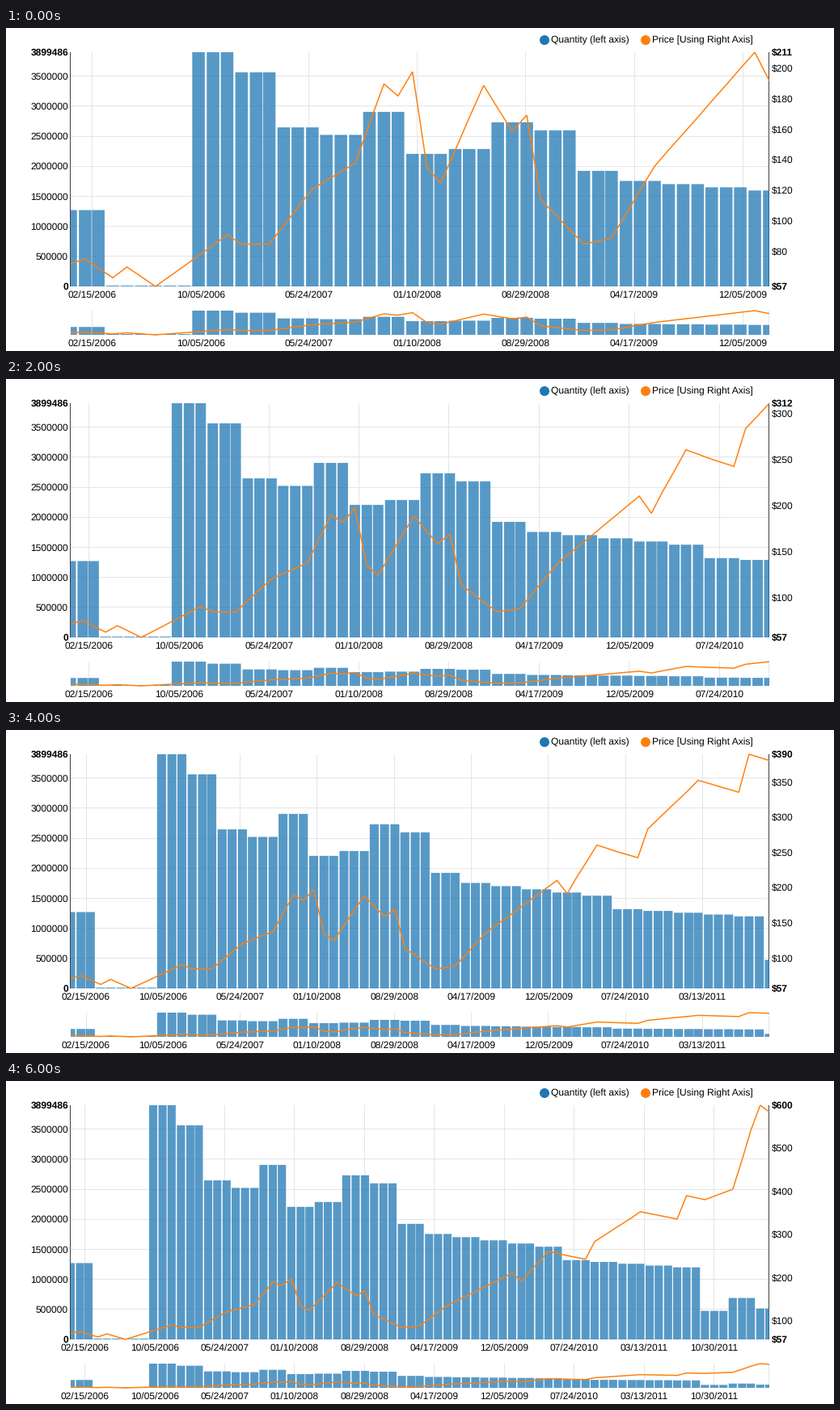
Recreate the animation shown at these times as a matplotlib script. Size 1024x400 px, loop 7000 ms.

```python
import numpy as np
import matplotlib.pyplot as plt
from matplotlib.animation import FuncAnimation
from matplotlib.patches import Circle, Rectangle

WIDTH, HEIGHT, DPI = 1024, 400, 100
PT = 72 / DPI                      # points per pixel
LEFT, RIGHT = 80, 944
MAIN = (30, 320)                   # top and bottom of each panel
FOCUS = (350, 380)
BLUE, ORANGE, GRID, AXIS = "#1f77b4", "#ff7f0e", "#e5e5e5", "#404040"

# Turning points, joined by straight runs
PRICE_TURNS = {0: 72, 1: 75.5, 3: 63, 4: 70, 6: 57.3, 11: 91, 12: 85, 14: 85,
               17: 121, 20: 138, 22: 190, 23: 182, 24: 198, 25: 135, 26: 125,
               29: 189, 31: 159, 32: 169.5, 33: 114, 36: 85, 38: 89, 41: 136,
               48: 210.7, 49: 192, 52: 261, 54: 251.5, 56: 243, 57: 284,
               62: 353, 66: 336, 67: 390, 69: 381, 72: 405, 74: 542,
               75: 599.6, 76: 584}
# Thousands sold, by quarter
QUANTITY_TURNS = {0: 1271, 1: 0, 2: 0, 3: 3899.486, 4: 3565, 5: 2648, 6: 2523,
                  7: 2906, 8: 2207, 9: 2288, 10: 2733, 11: 2599, 12: 1924,
                  13: 1756, 17: 1544, 18: 1320, 22: 1200, 23: 475, 24: 690,
                  25: 515}


def follow(turns, at):
    return np.interp(at, list(turns), list(turns.values()))


STEP_MONTHS = np.arange(77)
PRICE = follow(PRICE_TURNS, STEP_MONTHS)
QUANTITY = 1000 * follow(QUANTITY_TURNS, STEP_MONTHS // 3)

# Month ends in seconds, starting with December 2005
NEXT_MONTH = np.datetime64("2006-01") + STEP_MONTHS
TIMES = NEXT_MONTH.astype("datetime64[s]").astype(float) - 19 * 3600
DATE_STEP = 2e7

plt.rcParams["font.family"] = "Liberation Sans"
plt.rcParams["text.hinting"] = "none"
fig = plt.figure(figsize=(WIDTH / DPI, HEIGHT / DPI), dpi=DPI, facecolor="white")
ax = fig.add_axes([0, 0, 1, 1])


def crisp(v):
    """Centre of the pixel a one-pixel line falls on."""
    return np.ceil(v) - 0.5


def scale(value, domain, pixels):
    low, high = domain
    return pixels[0] + (value - low) / (high - low) * (pixels[1] - pixels[0])


def label(x, baseline, text, ha="left", bold=False):
    ax.text(x, baseline, text, ha=ha, va="baseline", fontsize=12 * PT,
            color="black", weight="bold" if bold else "normal", zorder=5)


def rule(xs, ys, color=GRID, z=1):
    ax.plot(xs, ys, color=color, lw=PT, zorder=z, solid_capstyle="butt", snap=False)


def date_text(seconds):
    day = np.datetime64(int(seconds) + 7200, "s").astype("datetime64[D]")
    year, month, dom = str(day).split("-")
    return f"{month}/{dom}/{year}"


def nice_step(span, count=8):
    """Round tick step of 1, 2 or 5 times a power of ten."""
    step = 10.0 ** np.floor(np.log10(span / count))
    error = count / span * step
    for limit, factor in ((0.15, 10), (0.35, 5), (0.75, 2)):
        if error <= limit:
            return step * factor
    return step


def draw_panel(panel, count):
    top, bottom = panel
    times, prices = TIMES[:count], PRICE[:count]
    span = times[0], times[-1]

    def to_x(t):
        return scale(t, span, (LEFT, RIGHT))

    first = np.ceil(span[0] / DATE_STEP) * DATE_STEP
    for tick in np.arange(first, span[1], DATE_STEP):
        x = to_x(tick)
        rule([crisp(x)] * 2, [top, bottom])
        label(x, bottom + 14, date_text(tick), "center")
    rule([crisp(RIGHT)] * 2, [top, bottom])

    clip = Rectangle((LEFT, top), RIGHT - LEFT, bottom - top, transform=ax.transData)
    slot = (RIGHT - LEFT) / count
    heights = np.maximum(QUANTITY[:count] / QUANTITY.max() * (bottom - top), 1)
    for x, height in zip(to_x(times), heights):
        bar = Rectangle((x - 0.45 * slot, bottom - height), 0.9 * slot, height,
                        fc=BLUE, alpha=0.75, lw=0, zorder=3, snap=False)
        ax.add_patch(bar)
        bar.set_clip_path(clip)

    y = scale(prices, (prices.min(), prices.max()), (bottom, top))
    ax.plot(to_x(times), y, color=ORANGE, lw=1.5 * PT, zorder=4,
            solid_joinstyle="miter", solid_capstyle="butt")


def draw_value_axes(prices):
    top, bottom = MAIN
    peak = round(QUANTITY.max())
    for tick in range(0, peak, 500000):
        y = scale(tick, (0, peak), (bottom, top))
        rule([LEFT, RIGHT], [crisp(y)] * 2)
        if tick:
            label(77, y + 4, str(tick), "right")
    label(77, bottom + 4, "0", "right", bold=True)
    label(77, top + 4, str(peak), "right", bold=True)

    low, high = prices.min(), prices.max()
    step = nice_step(high - low)
    for tick in np.arange(np.ceil(low / step) * step, high, step):
        y = scale(tick, (low, high), (bottom, top))
        if top + 10 <= y <= bottom - 10:
            label(947, y + 4, f"${tick:.0f}")
    label(947, bottom + 4, f"${low:.0f}", bold=True)
    label(947, top + 4, f"${high:.0f}", bold=True)

    for x in (LEFT, RIGHT):
        rule([crisp(x)] * 2, [top, bottom], AXIS, 2)


def draw_legend():
    for x, color, text in ((666, BLUE, "Quantity (left axis)"),
                           (791, ORANGE, "Price [Using Right Axis]")):
        ax.add_patch(Circle((x, 15), 6, fc=color, lw=0, zorder=5))
        label(x + 8, 19, text)


def draw(frame):
    ax.clear()
    ax.set(xlim=(0, WIDTH), ylim=(HEIGHT, 0))
    ax.axis("off")
    count = min(50 + 5 * frame, len(PRICE))
    draw_value_axes(PRICE[:count])
    draw_panel(MAIN, count)
    draw_panel(FOCUS, count)
    draw_legend()
    return []


anim = FuncAnimation(fig, draw, frames=7, interval=1000, init_func=lambda: [],
                     repeat=True, repeat_delay=0)
plt.show()
```
